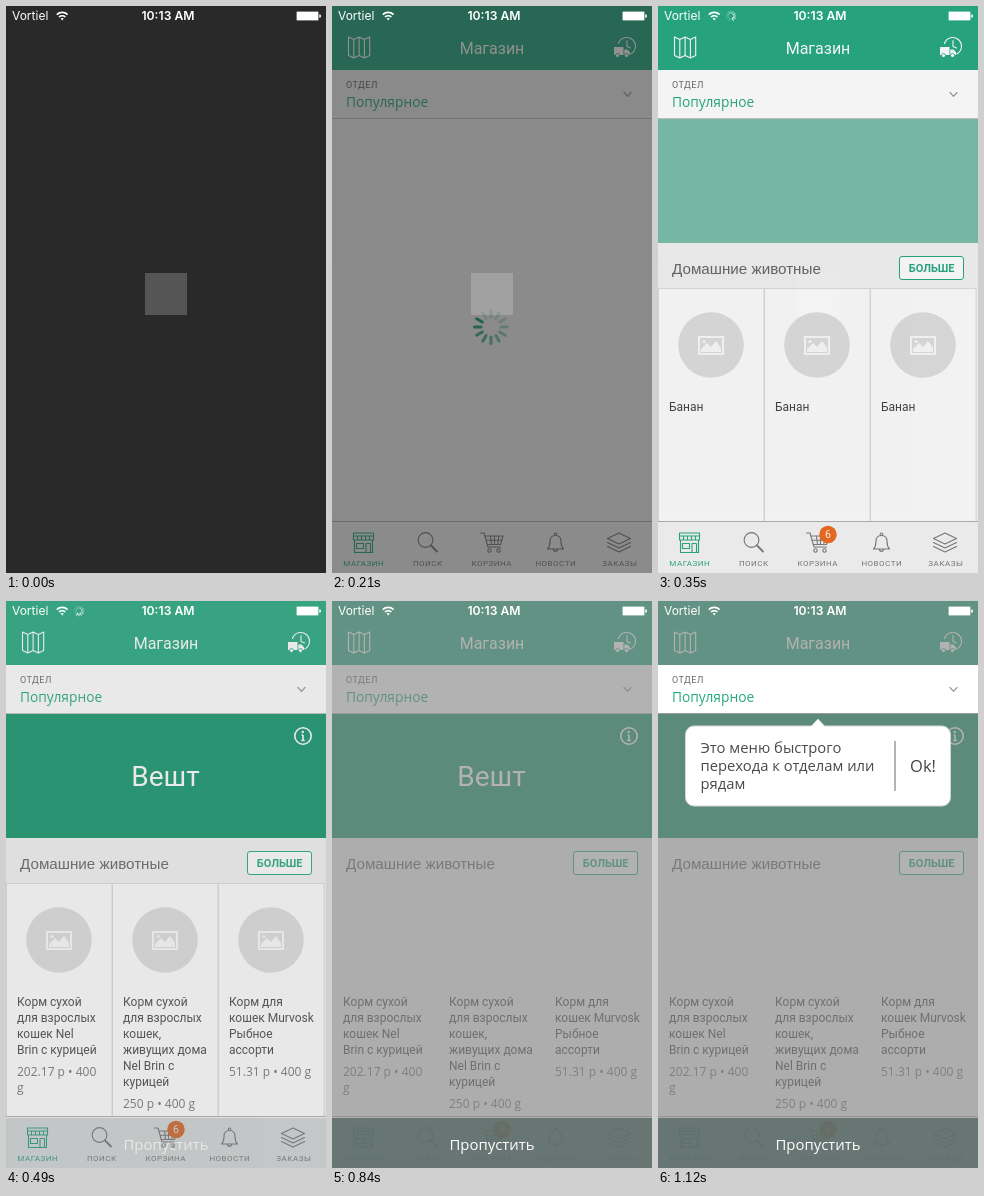
Write an HTML page that moves like this. It is 320x567 px and loops after 1400 ms.

```html
<!DOCTYPE html>
<html lang="ru">
<head>
<meta charset="utf-8">
<title>Магазин</title>
<style>
  html, body { margin: 0; width: 100%; height: 100%; overflow: hidden; background: #292929; }
  svg { display: block; width: 320px; height: 567px; }
  text { font-family: Roboto, "Noto Sans", sans-serif; white-space: pre; }
  .open { font-family: "Open Sans", "Noto Sans", sans-serif; }
  .sans { font-family: "Liberation Sans", Arial, sans-serif; }
  .status text { font: 12px Inter, "Noto Sans", sans-serif; fill: #fff; }
  .mid { text-anchor: middle; }
  .tab { font-size: 8px; letter-spacing: .5px; }
  .line { fill: none; stroke-linecap: round; stroke-linejoin: round; }
</style>
</head>
<body>
<svg viewBox="0 0 320 567">
  <rect width="320" height="567" fill="#f2f2f2"/>

  <g id="wheel" stroke="#1f9a72" stroke-width="3" stroke-linecap="round"></g>

  <g id="content">
    <g id="banner">
      <rect y="112" width="320" height="125" fill="#16966e"/>
    </g>
    <g id="brand">
      <text class="mid" x="159.5" y="185" font-size="28" fill="#fff">Вешт</text>
      <circle cx="297" cy="135" r="8.2" fill="none" stroke="#fff" stroke-width="1.6"/>
      <path d="M297 134v5.5M295.6 134h1.4M295.3 139.5h3.4" stroke="#fff" stroke-width="1.6"/>
      <circle cx="296.8" cy="131" r="1.2" fill="#fff"/>
    </g>
    <text class="sans" x="14" y="268" font-size="15.2" fill="#666">Домашние животные</text>
    <rect x="241.5" y="250.5" width="64" height="23" rx="2.5" fill="#fff" stroke="#26a980"/>
    <text class="mid" x="273.7" y="266" font-size="11" font-weight="700" fill="#26a980">БОЛЬШЕ</text>
    <g id="thumbs"></g>
    <g id="stubs" font-size="12" fill="#444"></g>
    <g id="goods" font-size="12" fill="#4a4a4a"></g>
  </g>

  <rect id="row" y="64" width="320" height="48" fill="#fff"/>
  <path d="M0 112.5H320" stroke="#c4c4c4"/>
  <text x="14" y="82" font-size="9" letter-spacing=".5" fill="#666">ОТДЕЛ</text>
  <text class="open" x="14" y="101" font-size="13.75" fill="#26a980">Популярное</text>
  <path class="line" d="M292 86.5l3.5 3.8 3.5-3.8" stroke="#999" stroke-width="1.2"/>

  <rect width="320" height="64" fill="#26a980"/>
  <text class="mid" x="160" y="48.3" font-size="16" fill="#fff">Магазин</text>
  <g class="line" stroke="#fff" stroke-width="1.1">
    <path d="M16.5 31l5.3 2.5 5.3-2.5 5.3 2.5 5.3-2.5V49.5l-5.3 2.5-5.3-2.5-5.3 2.5-5.3-2.5ZM21.8 33.5V52M27.1 31V49.5M32.4 33.5V52"/>
    <path d="M286.5 37.5A8.7 8.7 0 1 1 299 47.8M295 34.5V40.5L298.5 42"/>
  </g>
  <path d="M282 41h9.5v8H282ZM292.3 43.5h3.2l2.5 2.8V49h-5.7Z" fill="#fff"/>
  <g fill="#fff" stroke="#26a980" stroke-width=".8">
    <circle cx="285.5" cy="49.5" r="2"/><circle cx="294.5" cy="49.5" r="2"/>
  </g>

  <rect y="516" width="320" height="51" fill="#f4f4f4"/>
  <path d="M0 515.5H320" stroke="#b0b0b0"/>
  <g class="line" stroke="#26a980" stroke-width="1.1">
    <path d="M21.5 527H41.5V534H21.5ZM22.5 534V546.5H40.5V534M21.5 530H41.5M25.5 530v4M29.5 530v4M33.5 530v4M37.5 530v4M24.5 537.5h7v5h-7ZM34 546.5v-9h4.5v9"/>
  </g>
  <g class="line" stroke="#7a7a7a" stroke-width="1.1">
    <circle cx="93.5" cy="534" r="7.4"/>
    <path d="M99 539.5L105 545.5" stroke-width="1.8"/>
    <path d="M148.5 527H152L156 541H168.5M153 530H171L168.5 538.5H155.3M154 534.3H169.8M158.5 530l1 8.5M162.5 530v8.5M166.8 530l-1 8.5"/>
    <circle cx="157.5" cy="544.5" r="1.7"/><circle cx="166.5" cy="544.5" r="1.7"/>
    <path d="M215.5 543H231.5C229 540.5 229 538 229 535.5C229 531.5 227 529.5 223.5 529.5S218 531.5 218 535.5C218 538 218 540.5 215.5 543ZM221.3 543.5a2.3 2.6 0 0 0 4.4 0M222.3 529.2a1.3 1.6 0 1 1 2.4 0"/>
    <path d="M275.5 532.5L287 527l11.5 5.5L287 538ZM275.5 536.5L287 542l11.5-5.5M275.5 540.5L287 546l11.5-5.5"/>
  </g>
  <g id="tabs"></g>
  <g id="badge">
    <circle cx="170" cy="528.5" r="8.7" fill="#ee6a22"/>
    <text class="mid" x="170" y="532.2" font-size="10.5" fill="#fff">6</text>
  </g>

  <g id="splash">
    <rect width="320" height="567" fill="#292929"/>
    <rect x="139" y="267" width="42" height="42" fill="#555"/>
  </g>

  <path id="dim" fill="#858585" fill-rule="evenodd"/>
  <g id="skip">
    <rect y="517" width="320" height="50" fill="#5b6b69" fill-opacity=".85"/>
    <text class="mid open" x="160" y="548.7" font-size="14.9" fill="#fff">Пропустить</text>
  </g>

  <g id="tip">
    <path d="M36 125H153.5L160 118L166.5 125H284a8.5 8.5 0 0 1 8.5 8.5V196.5a8.5 8.5 0 0 1-8.5 8.5H36a8.5 8.5 0 0 1-8.5-8.5V133.5A8.5 8.5 0 0 1 36 125Z" fill="#fff" stroke="#d2d6d5"/>
    <path d="M237 140V190" stroke="#8a8a8a" stroke-width="1.3"/>
    <g id="tipText" font-size="14.8" fill="#4a4a4a"></g>
    <text class="open mid" x="265" y="171" font-size="16.5" fill="#444">Ok!</text>
  </g>

  <g class="status">
    <text x="6" y="14.4">Vortiel</text>
    <g fill="none" stroke="#fff" stroke-width="1.7">
      <path d="M50.8 8.6a7.8 7.8 0 0 1 10.8 0M53 11a4.7 4.7 0 0 1 6.4 0"/>
    </g>
    <path d="M54.6 12.6a2.4 2.4 0 0 1 3.2 0L56.2 14.4Z" fill="#fff"/>
    <g id="net" stroke="#fff" stroke-width="1" stroke-linecap="round"></g>
    <text class="mid" x="162" y="14.4" style="font-size:12.2px;font-weight:600">10:13 AM</text>
    <rect x="290.5" y="5.5" width="22" height="9" rx="1" fill="none" stroke="#fff" stroke-opacity=".4"/>
    <rect x="291" y="6" width="21" height="8" fill="#fff"/>
    <path d="M313.3 8.3a1.8 1.8 0 0 1 0 3.6Z" fill="#fff"/>
  </g>
</svg>

<script>
const LOOP = 1400, STEP = 70;
const $ = id => document.getElementById(id);

function add(parent, tag, attrs, text) {
  const el = document.createElementNS('http://www.w3.org/2000/svg', tag);
  for (const key in attrs) el.setAttribute(key, attrs[key]);
  if (text) el.textContent = text;
  parent.append(el);
  return el;
}

function lines(parent, list, x, y, gap, attrs) {
  list.forEach((s, i) => add(parent, 'text', { x, y: y + i * gap, ...attrs }, s));
}

const goods = [
  [['Корм сухой', 'для взрослых', 'кошек Nel', 'Brin с курицей'], ['202.17 р • 400', 'g']],
  [['Корм сухой', 'для взрослых', 'кошек,', 'живущих дома', 'Nel Brin с', 'курицей'], ['250 р • 400 g']],
  [['Корм для', 'кошек Murvosk', 'Рыбное', 'ассорти'], ['51.31 р • 400 g']]
];

goods.forEach(([name, price], i) => {
  const x = i * 106, cx = x + 53, thumbs = $('thumbs');
  add(thumbs, 'rect', { x: x + .5, y: 282.5, width: 105.5, height: 233, fill: '#fdfdfd', stroke: '#dcdcdc' });
  add(thumbs, 'circle', { cx, cy: 339, r: 32.8, fill: '#dedede' });
  add(thumbs, 'rect', { x: cx - 12, y: 331, width: 24, height: 17, fill: 'none', stroke: '#fbfbfb', 'stroke-width': 2 });
  add(thumbs, 'path', { d: `M${cx - 10} 346v-3l6-6 4 4 5-6 5 7v4Z`, fill: '#fbfbfb' });
  add(thumbs, 'circle', { cx: cx - 7, cy: 335.5, r: 1.5, fill: '#fbfbfb' });
  add($('stubs'), 'text', { x: x + 11, y: 404.7 }, 'Банан');
  lines($('goods'), name, x + 11, 405, 16);
  lines($('goods'), price, x + 11, 411 + name.length * 16, 16, { class: 'open', fill: '#777' });
});

['МАГАЗИН', 'ПОИСК', 'КОРЗИНА', 'НОВОСТИ', 'ЗАКАЗЫ'].forEach((s, i) =>
  add($('tabs'), 'text', { class: 'tab mid', x: 31.8 + i * 64, y: 560, fill: i ? '#7a7a7a' : '#26a980' }, s));

lines($('tipText'), ['Это меню быстрого', 'перехода к отделам или', 'рядам'], 42.5, 152, 18, { class: 'open' });

// Twelve spokes around a centre, fading behind the leading one
function spinner(id, cx, cy, inner, outer) {
  const spokes = Array.from({ length: 12 }, (_, i) => add($(id), 'path', {
    d: `M${cx} ${cy - inner}V${cy - outer}`, transform: `rotate(${i * 30} ${cx} ${cy})`
  }));
  return head => spokes.forEach((el, i) => {
    const behind = (head - i + 120) % 12;
    el.setAttribute('opacity', Math.max(.22, 1 - behind * .09));
  });
}
const turnWheel = spinner('wheel', 159, 321, 10, 16.5);
const turnNet = spinner('net', 73, 10, 2.6, 4.8);

// [time, value] pairs; each value holds until the next time
const tracks = {
  splash: [[0, 1], [140, .84], [210, .51], [280, .2], [350, .05], [420, 0]],
  wheel: [[0, 1], [350, 0]],
  content: [[0, 0], [350, 1]],
  row: [[0, 0], [280, .5], [350, 1]],
  badge: [[0, 0], [350, 1]],
  banner: [[0, 0], [350, .55], [420, .85], [490, 1]],
  brand: [[0, 0], [420, .6], [490, 1]],
  stubs: [[0, 1], [420, 0]],
  goods: [[0, 0], [420, 1]],
  thumbs: [[0, 1], [700, 0]],
  net: [[0, 0], [350, 1], [700, 0]],
  dim: [[0, 0], [490, .18], [560, .4], [630, .54], [700, .63]],
  skip: [[0, 0], [490, .25], [560, .52], [630, .82], [700, 1]],
  tip: [[0, 0], [910, .3], [980, .6], [1050, .88], [1120, 1]]
};
const hole = [[0, 0], [910, .4], [980, .72], [1050, .93], [1120, 1]];

const at = (track, t) => track.reduce((v, [time, value]) => t >= time ? value : v, 0);

function draw(t) {
  for (const id in tracks) $(id).setAttribute('opacity', at(tracks[id], t));
  const k = at(hole, t), w = 320 * k, h = 48 * k;
  $('dim').setAttribute('d',
    `M0 0H320V567H0Z M${160 - w / 2} ${88 - h / 2}h${w}v${h}h${-w}Z`);
  const step = Math.floor(t / STEP);
  turnWheel(7 + step);
  turnNet(step);
}

const start = performance.now();
function tick() {
  draw((performance.now() - start) % LOOP);
  requestAnimationFrame(tick);
}
tick();
</script>
</body>
</html>
```
